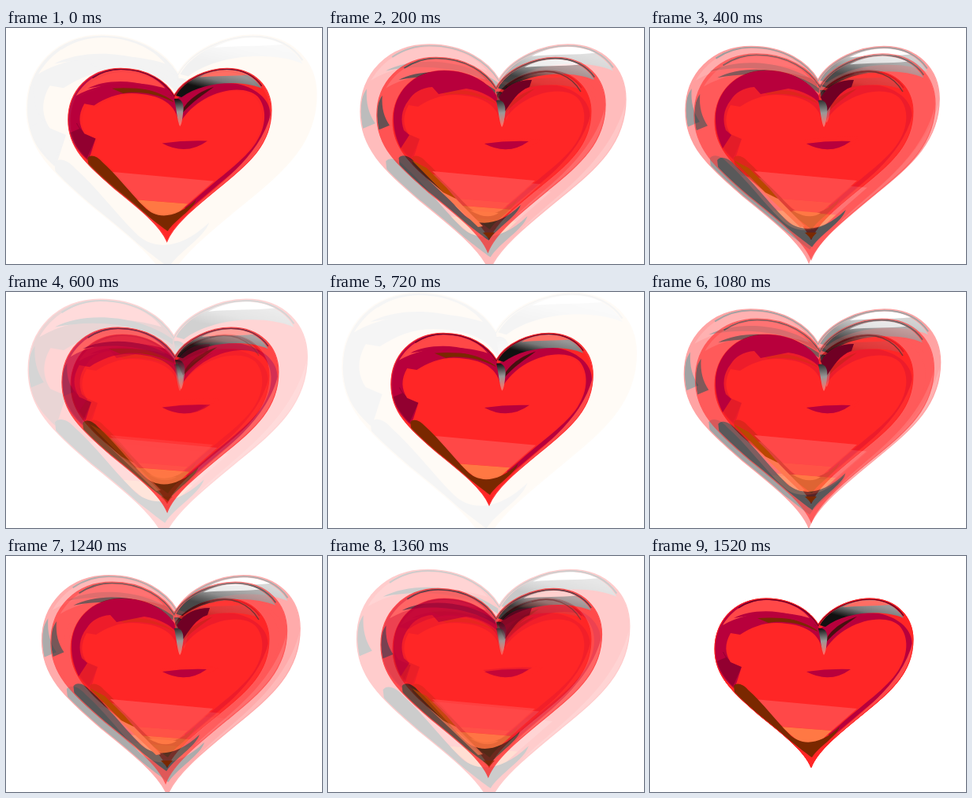
Animation of 400 by 300 pixels, one loop 1.56 s. Source, as an HTML page with a canvas:

```html
<!DOCTYPE html>
<html lang="en">
<head>
<meta charset="utf-8">
<title>Beating heart</title>
<style>
html, body { margin: 0; width: 100%; height: 100%; overflow: hidden; background: #fff; }
canvas { display: block; }
</style>
</head>
<body>
<canvas id="stage" width="400" height="300"></canvas>
<script>
const stage = document.getElementById('stage').getContext('2d');
const STEP = 40, STEPS = 39, HALF = 19.75;
const CX = 207.5, CY = 161.5;

const path = d => new Path2D(d);
const outline = path('M213 87C225 66 255 54 278 54C312 54 333 77 333 106C333 148 305 172 272 199C238 227 212 248 204 269C196 249 170 228 139 203C103 172 82 152 82 118C82 82 108 54 147 54C180 54 203 70 213 87Z');
const leftSide = path('M213 87C203 70 180 54 147 54C108 54 82 82 82 118C82 140 91 154 106 168L122 140L150 100L218 118Z');
const leftDeep = path('M83 122C84 140 92 152 105 166L116 141C104 136 97 131 93 122Z');
const leftPatch = path('M82 118C82 108 84 102 88 96C87 110 90 120 96 129L84 134Z');
const rightSide = path('M218 118L216 92C232 76 260 70 290 73C322 80 335 100 331 118C326 150 302 170 268 198L228 232L222 215Z');
const rim = path('M333 108C333 148 305 172 272 199L234 230C262 200 318 168 333 108Z');
const body = path('M219 124C216 98 197 86 160 85C142 85 128 91 114 100L102 98C94 112 95 124 102 135L116 141L109 163C130 186 152 206 176 230C190 242 208 243 222 230L240 215C270 188 300 168 314 146C327 126 328 103 316 89C296 70 240 84 219 124Z');
const leftCap = path('M92 88C104 68 122 57 147 56C172 56 192 66 202 79C168 68 122 70 92 88Z');
const leftArc = path('M106 79C130 66 178 66 212 90L212 95C192 80 150 70 106 79Z');
const leftBand = path('M136 79C160 77 190 80 210 88L212 96C190 84 165 82 150 85Z');
const rightCap = path('M215 88C226 68 255 56 278 56C298 56 314 66 321 79C296 68 248 70 222 90Z');
const rightBand = path('M221 112C224 98 240 84 262 77C250 86 234 96 221 112Z');
const shine = path('M244 65C262 55 286 53 304 62C286 64 264 63 244 65Z');
const edge = path('M112 66C124 58 136 55 147 55C180 55 202 71 213 88C225 67 255 55 278 55C298 55 313 64 321 76');
const cleft = path('M213 92C221 90 226 97 224 108C223 118 222 124 220 126C217 120 216 106 213 92Z');
const smile = path('M198 147Q226 143 254 144Q228 163 198 147Z');
const glow = path('M132 182L262 194L230 222L168 217Z');
const ember = path('M166 217L230 222L216 235Q202 245 187 235Z');
const lowBand = path('M106 165C110 160 118 163 124 170C142 186 160 210 176 226C190 241 214 242 240 217C236 230 214 242 205 256C199 252 184 240 166 226C142 208 122 192 107 174Z');

const coreLeft = path('M213 85C203 70 180 54 147 54C108 54 83 82 83 115C83 130 87 142 92 153L103 136L96 130C92 118 92 105 102 92C108 82 118 76 132 75L140 84L175 77C195 80 208 88 215 96Z');
const coreRight = path('M216 88C226 72 240 66 258 66L255 75C240 80 232 95 224 106Z');
const coreArc = path('M258 58C284 50 308 60 320 81');
const coreStreak = path('M106 168L125 178L150 203L162 217L146 209Z');
const coreSalmon = path('M124 190L146 209L162 217L196 252L190 253Z');
const coreEmber = path('M180 232L216 235Q202 245 180 232Z');
const coreTip = path('M196 260L211 260L204 268Z');

const RED = [255, 38, 38], PINK = [255, 72, 72], MAROON = [184, 0, 60];
const BROWN = [122, 40, 0], ORANGE = [255, 120, 68], DARK = [36, 36, 38];
const CREAM = [255, 165, 60], WHITE = [255, 255, 255];

const clamp = v => Math.max(0, Math.min(1, v));
const mix = (a, b, k) => a.map((v, i) => v + (b[i] - v) * k);
const css = c => Array.isArray(c) ? `rgb(${c.map(Math.round)})` : c;

function fill(c, shape, color) {
  c.fillStyle = css(color);
  c.fill(shape);
}

function stroke(c, shape, color, width) {
  c.strokeStyle = css(color);
  c.lineWidth = width;
  c.stroke(shape);
}

function gradient(c, x0, y0, x1, y1, ...colors) {
  const g = c.createLinearGradient(x0, y0, x1, y1);
  colors.forEach((color, i) => g.addColorStop(i / (colors.length - 1), color));
  return g;
}

// grey: shadows lose their hue as a copy grows
// warm: faint reds turn to cream; faint: the left side darkens again
function paintHeart(c, grey = 0, warm = 0, faint = 0) {
  const base = mix(RED, CREAM, warm), light = mix(PINK, CREAM, warm);
  const side = mix(base, DARK, faint);
  const shade = color => mix(color, DARK, grey);
  fill(c, outline, base);
  c.save();
  c.clip(outline);
  fill(c, leftSide, mix(MAROON, side, grey));
  fill(c, leftDeep, mix([146, 0, 48], side, grey));
  fill(c, leftPatch, shade(MAROON));
  fill(c, rightSide, mix(MAROON, base, grey));
  fill(c, rim, light);
  fill(c, leftBand, mix(BROWN, side, grey));
  fill(c, rightBand, mix([70, 16, 16], base, grey));
  fill(c, body, base);
  fill(c, leftCap, light);
  fill(c, leftArc, shade(MAROON));
  fill(c, rightCap, gradient(c, 262, 55, 256, 80, '#999', '#777', '#111'));
  fill(c, shine, mix([255, 110, 100], WHITE, grey));
  stroke(c, edge, shade([110, 0, 36]), 1.5);
  fill(c, glow, light);
  fill(c, ember, mix(ORANGE, CREAM, warm));
  fill(c, lowBand, shade(BROWN));
  fill(c, smile, mix(MAROON, base, grey));
  fill(c, cleft, gradient(c, 217, 92, 220, 124, '#111', '#999', '#ff7068'));
  c.restore();
  stroke(c, outline, base, 1);
}

// Details of the resting heart that stay visible through the copies
function paintCore(c, strength) {
  c.globalAlpha = strength;
  fill(c, coreLeft, MAROON);
  fill(c, coreRight, [112, 0, 36]);
  stroke(c, coreArc, [120, 50, 50], 1.5);
  fill(c, glow, PINK);
  fill(c, coreSalmon, [255, 120, 80]);
  fill(c, coreStreak, [184, 72, 0]);
  fill(c, coreEmber, ORANGE);
  fill(c, coreTip, BROWN);
  fill(c, smile, MAROON);
  fill(c, cleft, gradient(c, 217, 92, 220, 124, '#333', '#999', '#ff7068'));
  c.globalAlpha = 1;
}

const layerCanvas = document.createElement('canvas');
layerCanvas.width = 400;
layerCanvas.height = 300;
const layer = layerCanvas.getContext('2d');

function drawCopy({ scale, x, y, alpha }) {
  layer.setTransform(1, 0, 0, 1, 0, 0);
  layer.clearRect(0, 0, 400, 300);
  layer.setTransform(scale, 0, 0, scale, x - CX * scale, y - CY * scale);
  paintHeart(layer, clamp((scale - 1.08) / 0.05), clamp((0.18 - alpha) / 0.12), clamp((0.22 - alpha) / 0.06));
  stage.globalAlpha = clamp(alpha);
  stage.drawImage(layerCanvas, 0, 0);
  stage.globalAlpha = 1;
}

const start = performance.now();
function render(now) {
  const step = (Math.floor(Math.max(0, now - start) / STEP) + 1) % STEPS;
  const p = 1 - Math.abs(step - HALF) / HALF;
  const q = 1 - p;
  const copies = [
    { scale: 1 + 0.502 * p, x: CX - 3.4 * p, y: CY - 1.2 * p, alpha: q },
    { scale: 1 + 0.486 * q, x: CX + 2.2 * q, y: CY + 4.8 * q, alpha: p }
  ];
  stage.fillStyle = '#fff';
  stage.fillRect(0, 0, 400, 300);
  paintHeart(stage);
  copies.sort((a, b) => b.scale - a.scale).forEach(drawCopy);
  paintCore(stage, clamp((Math.min(p, q) - 0.14) * 8));
  requestAnimationFrame(render);
}
render(start);
</script>
</body>
</html>
```
